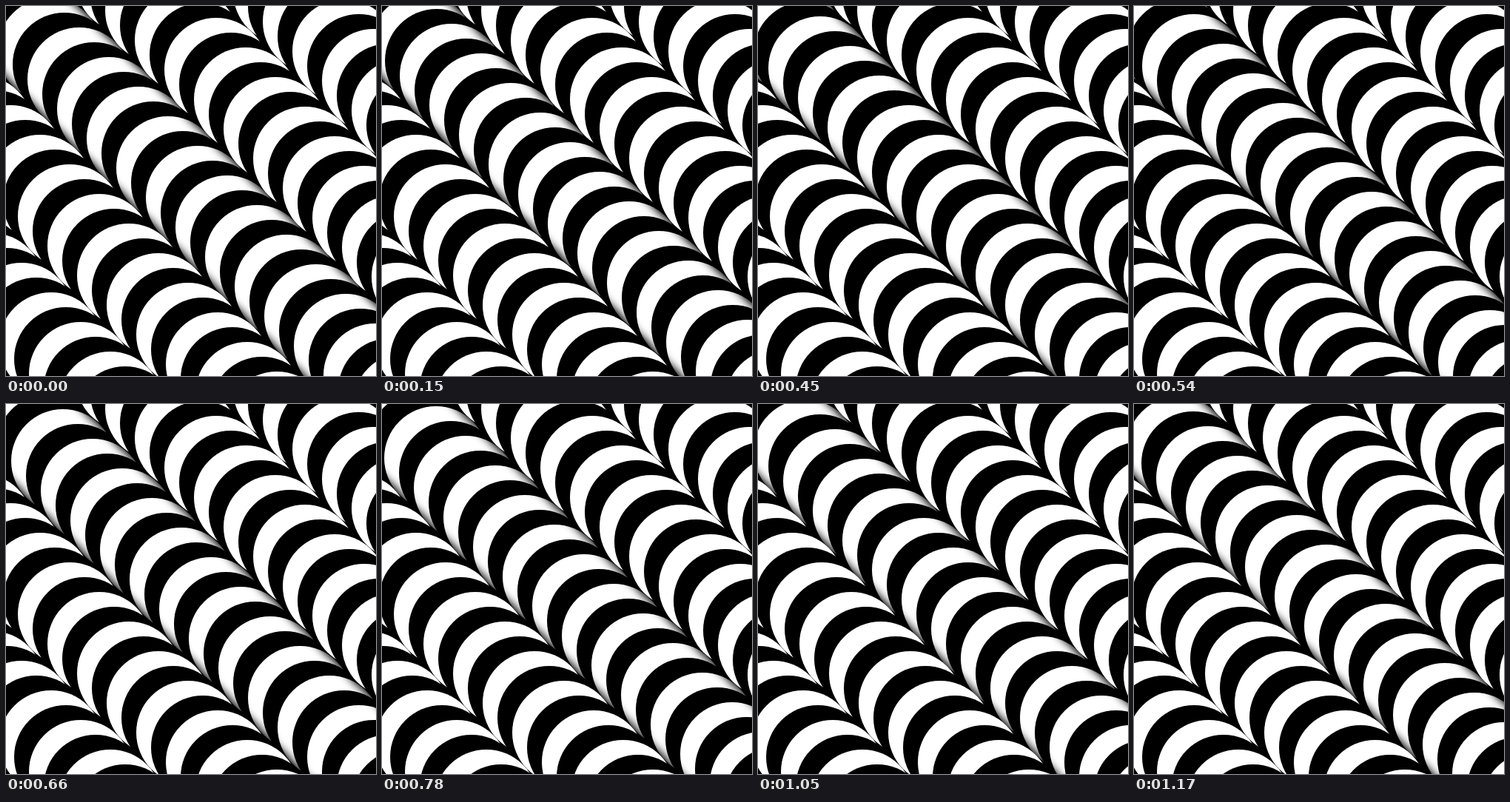
An HTML page with a canvas for the animation above (1.2 s loop, 500x500 px).

```html
<!DOCTYPE html>
<html>
<head>
<meta charset="utf-8">
<title>Striped tubes</title>
<style>
html, body { margin: 0; height: 100%; overflow: hidden; background: #000; }
canvas { display: block; }
</style>
</head>
<body>
<canvas id="stage" width="500" height="500"></canvas>
<script>
const SIZE = 500, PAD = 60, RADIUS = 70, STEP = 20, GAP = 99;
const LOOP = 1200, TICK = 30;

const ctx = document.getElementById('stage').getContext('2d');

// A diagonal row of overlapping discs, alternately black and white.
function drawTube(c, row, phase) {
  for (let i = 0; i < 44; i++) {
    const m = phase - 200 + i * STEP + RADIUS;
    c.fillStyle = i % 2 ? '#fff' : '#000';
    c.beginPath();
    c.arc(m + row * GAP, m - row * GAP, RADIUS, 0, Math.PI * 2);
    c.fill();
  }
}

// The still tubes, padded so that their shadow stays even at the stage edges.
const still = document.createElement('canvas');
still.width = still.height = SIZE + 2 * PAD;
const stillCtx = still.getContext('2d');
stillCtx.translate(PAD, PAD);
for (const row of [-2, 2]) drawTube(stillCtx, row, 9);
for (const row of [-1, 1]) drawTube(stillCtx, row, 15);

function draw(time) {
  const shift = Math.floor((time % LOOP) / TICK);
  ctx.shadowBlur = 0;
  ctx.shadowColor = 'transparent';
  ctx.fillStyle = '#000';
  ctx.fillRect(0, 0, SIZE, SIZE);
  drawTube(ctx, 0, 9 - shift);

  // Two passes deepen the shadow.
  ctx.shadowColor = '#000';
  ctx.shadowBlur = 14;
  ctx.drawImage(still, -PAD, -PAD);
  ctx.drawImage(still, -PAD, -PAD);
}

const start = performance.now();
function frame() {
  draw(performance.now() - start);
  requestAnimationFrame(frame);
}
frame();
</script>
</body>
</html>
```
